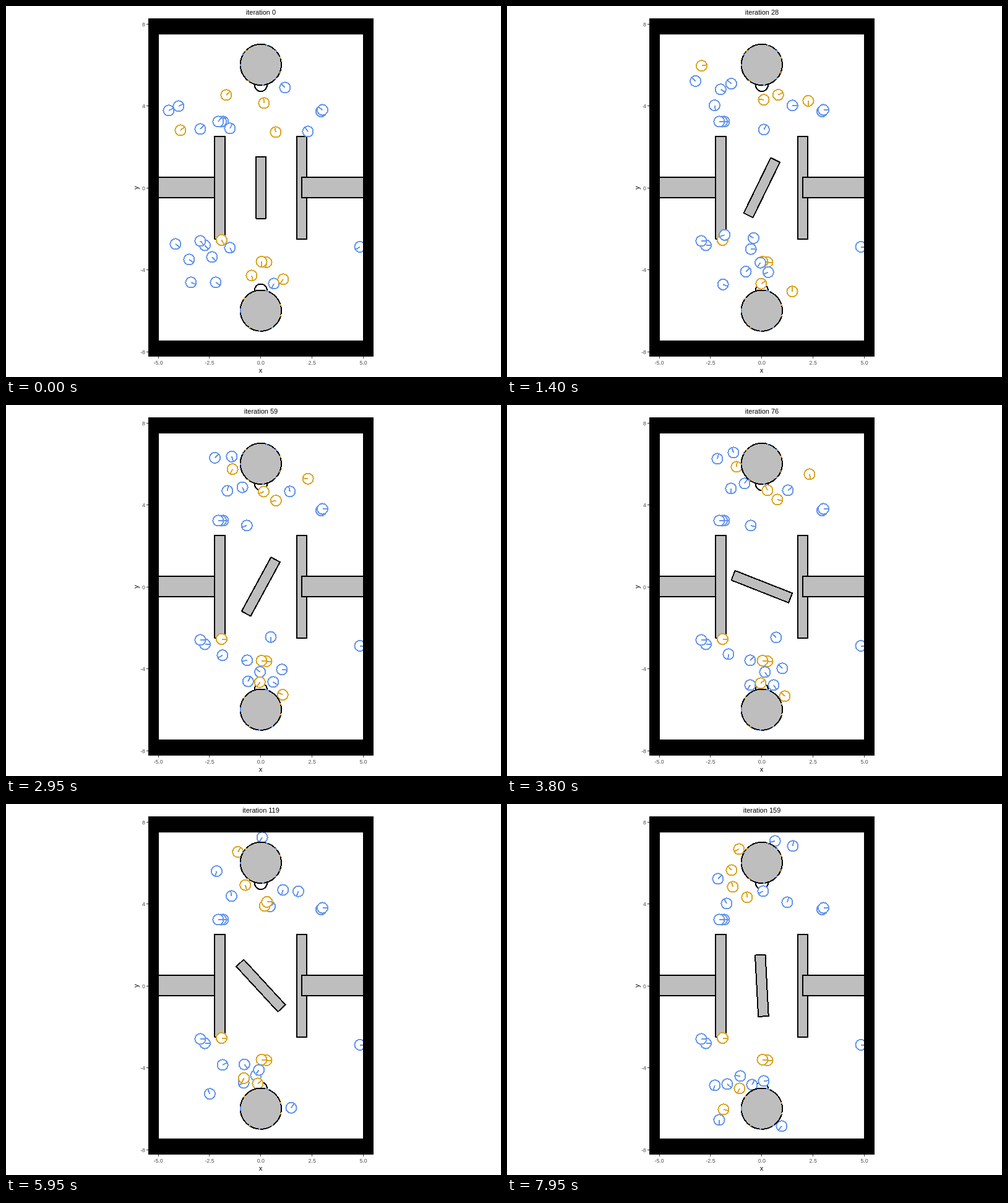
Animation of 800 by 600 pixels, one loop 8 s. Source, as an HTML page:

```html
<!DOCTYPE html>
<html lang="en">
<head>
<meta charset="utf-8">
<title>Agent simulation</title>
<style>
  html, body { margin: 0; width: 100%; height: 100%; overflow: hidden; background: #fff; }
  svg { display: block; width: 800px; height: 600px; font-family: "Liberation Sans", Arial, sans-serif; shape-rendering: crispEdges; }
  .solid { fill: #bebebe; stroke: #000; stroke-width: 2; stroke-linejoin: round; }
  .agent { fill: #fff; stroke-width: 2; }
  .tick { stroke: #333; stroke-width: 1; }
  .label { font-size: 8.8px; fill: #4d4d4d; }
  .title { font-size: 11px; text-anchor: middle; }
</style>
</head>
<body>
<svg id="stage" viewBox="0 0 800 600"></svg>
<script>
const BLUE = '#6495ed', GOLD = '#daa520';
const SCALE = 33.15, CX = 411.85, CY = 293.8;
const STEP = 50, COUNT = 160, MIDDLE = 76;
const NESTS = [6, -6];
const CLEARANCE = 41;
// Iteration and angle of the turning bar.
const BAR = [[0, 0], [28, 26], [59, 28.5], [76, 111.5], [100, 153.5], [137, 122], [159, 177]];

const stage = document.getElementById('stage');
const px = x => CX + x * SCALE;
const py = y => CY - y * SCALE;
const mix = (a, b, u) => a + (b - a) * u;
const degrees = angle => angle * 180 / Math.PI;
const noise = k => { const s = Math.sin(k * 12.9898) * 43758.5453; return s - Math.floor(s); };

function add(name, attrs, parent = stage) {
  const node = document.createElementNS('http://www.w3.org/2000/svg', name);
  for (const key in attrs) node.setAttribute(key, attrs[key]);
  return parent.appendChild(node);
}

function text(x, y, content, attrs) {
  const node = add('text', { x, y, ...attrs });
  node.textContent = content;
  return node;
}

// Wall given by its centre and size in plot units.
function wall(x, y, width, height) {
  return add('rect', {
    x: px(x - width / 2), y: py(y + height / 2),
    width: width * SCALE, height: height * SCALE, class: 'solid'
  });
}

const updates = [];

function agent(color) {
  const group = add('g', { stroke: color, class: 'agent' });
  add('circle', { r: 8.6 }, group);
  const hand = add('line', { x2: 8.6 }, group);
  return (x, y, heading) => {
    group.setAttribute('transform', `translate(${x.toFixed(2)} ${y.toFixed(2)})`);
    hand.setAttribute('transform', `rotate(${heading.toFixed(1)})`);
  };
}

const nestY = y => py(y < CY ? NESTS[0] : NESTS[1]);
const towardNest = (x, y) => degrees(Math.atan2(nestY(y) - y, CX - x));

function resting(color, x, y) {
  const place = agent(color);
  updates.push(n => place(x, y, n ? 0 : towardNest(x, y)));
}

// Moves round its nest by way of a start, a middle and an end point.
function walker(color, ...coords) {
  const place = agent(color);
  const seed = updates.length * 2.4;
  const cy = nestY(coords[1]);
  const stops = [0, 2, 4].map(k => {
    const dx = coords[k] - CX, dy = coords[k + 1] - cy;
    return { angle: Math.atan2(dy, dx), radius: Math.hypot(dx, dy) };
  });
  updates.push(n => {
    const leg = n < MIDDLE ? 0 : 1;
    const u = leg ? (n - MIDDLE) / (COUNT - 1 - MIDDLE) : 1 - (1 - n / MIDDLE) ** 2;
    const from = stops[leg], to = stops[leg + 1];
    const turn = Math.atan2(Math.sin(to.angle - from.angle), Math.cos(to.angle - from.angle));
    const stray = Math.sin(Math.PI * u);
    const angle = from.angle + turn * u + 0.35 * stray * Math.sin(seed + n * 0.08);
    const radius = Math.max(CLEARANCE,
      mix(from.radius, to.radius, u) + 8 * stray * Math.sin(seed * 1.7 + n * 0.1));
    const x = CX + radius * Math.cos(angle), y = cy + radius * Math.sin(angle);
    const swing = 130 * Math.min(1, n / 25) * Math.sin(seed + n * 0.25);
    place(x, y, towardNest(x, y) + swing);
  });
}

function nest(side) {
  const cy = py(side);
  add('circle', { cx: CX, cy, r: SCALE, class: 'solid' });
  for (let k = 0; k < 10; k++) {
    const angle = 36 * (k + noise(k + side));
    add('line', {
      x1: SCALE, x2: SCALE, y1: -1.7, y2: 1.7, 'stroke-width': 1.8,
      stroke: k % 3 ? BLUE : GOLD,
      transform: `translate(${CX} ${cy}) rotate(${angle})`
    });
  }
}

add('rect', { width: 800, height: 600, fill: '#fff' });

wall(-3.625, 0, 2.75, 1);
wall(-2, 0, 0.5, 5);
wall(2, 0, 0.5, 5);
wall(3.5, 0, 3, 1);
const bar = wall(0, 0, 0.5, 3);
for (const side of NESTS) {
  add('circle', {
    cx: CX, cy: py(side * 5 / 6), r: 10, fill: '#fff', stroke: '#000', 'stroke-width': 2
  });
}

for (const x of [351, 347.5, 343]) resting(BLUE, x, 187);
resting(BLUE, 509.5, 170.5);
resting(BLUE, 511.5, 168);
resting(BLUE, 321.5, 387);
resting(BLUE, 314, 380);
resting(BLUE, 572, 389.5);
resting(GOLD, 348.5, 378.5);
resting(GOLD, 421, 414.5);
resting(GOLD, 413, 413.5);

walker(BLUE, 263, 169, 362, 135, 341, 121);
walker(BLUE, 279, 162, 340, 87, 355, 161);
walker(BLUE, 314, 199, 384, 127, 462, 68);
walker(BLUE, 362, 198, 394, 195, 414, 141);
walker(BLUE, 451, 132, 366, 77, 433, 60);
walker(BLUE, 488, 203, 454, 138, 453, 159);
walker(GOLD, 356, 144, 421, 138, 363, 107);
walker(GOLD, 282, 201, 371, 100, 375, 73);
walker(GOLD, 417, 157, 437, 153, 365, 134);
walker(GOLD, 436, 204, 489, 112, 388, 151);

walker(BLUE, 274, 385, 358, 403, 343, 511);
walker(BLUE, 296, 410, 393, 453, 396, 454);
walker(BLUE, 333, 406, 393, 413, 336, 455);
walker(BLUE, 362, 391, 435, 376, 356, 453);
walker(BLUE, 299, 447, 431, 453, 444, 521);
walker(BLUE, 339, 447, 417, 432, 377, 440);
walker(BLUE, 433, 449, 445, 426, 415, 448);
walker(GOLD, 397, 436, 410, 450, 350, 494);
walker(GOLD, 448, 442, 449, 471, 376, 460);

NESTS.forEach(nest);

// Black frame; its inner edge reaches one pixel into the field.
const ring = (w, h) => `M${CX - w} ${CY - h}h${2 * w}v${2 * h}h${-2 * w}z`;
add('path', {
  d: ring(5.5 * SCALE, 8.25 * SCALE) + ring(5 * SCALE - 1, 7.5 * SCALE - 1),
  'fill-rule': 'evenodd'
});

for (let v = -5; v <= 5; v += 2.5) {
  const x = px(v);
  add('line', { x1: x, x2: x, y1: 567, y2: 570, class: 'tick' });
  text(x, 580, v.toFixed(1), { class: 'label', 'text-anchor': 'middle' });
}
for (let v = -8; v <= 8; v += 4) {
  const y = py(v) + 0.5;
  add('line', { x1: 227, x2: 230, y1: y, y2: y, class: 'tick' });
  text(225, y + 3.5, v, { class: 'label', 'text-anchor': 'end' });
}
text(411.5, 593, 'x', { class: 'title' });
text(0, 0, 'y', { class: 'title', transform: 'translate(214 294) rotate(-90)' });
const title = text(412, 14, '', { class: 'title' });

function barAngle(n) {
  const k = BAR.findIndex(([end]) => end >= n) || 1;
  const [n0, a0] = BAR[k - 1], [n1, a1] = BAR[k];
  return mix(a0, a1, (n - n0) / (n1 - n0));
}

const start = performance.now();

function draw(now) {
  const n = Math.floor(Math.max(0, now - start) / STEP) % COUNT;
  title.textContent = `iteration ${n}`;
  bar.setAttribute('transform', `rotate(${barAngle(n)} ${CX} ${CY})`);
  for (const update of updates) update(n);
  requestAnimationFrame(draw);
}
draw(start);
</script>
</body>
</html>
```
